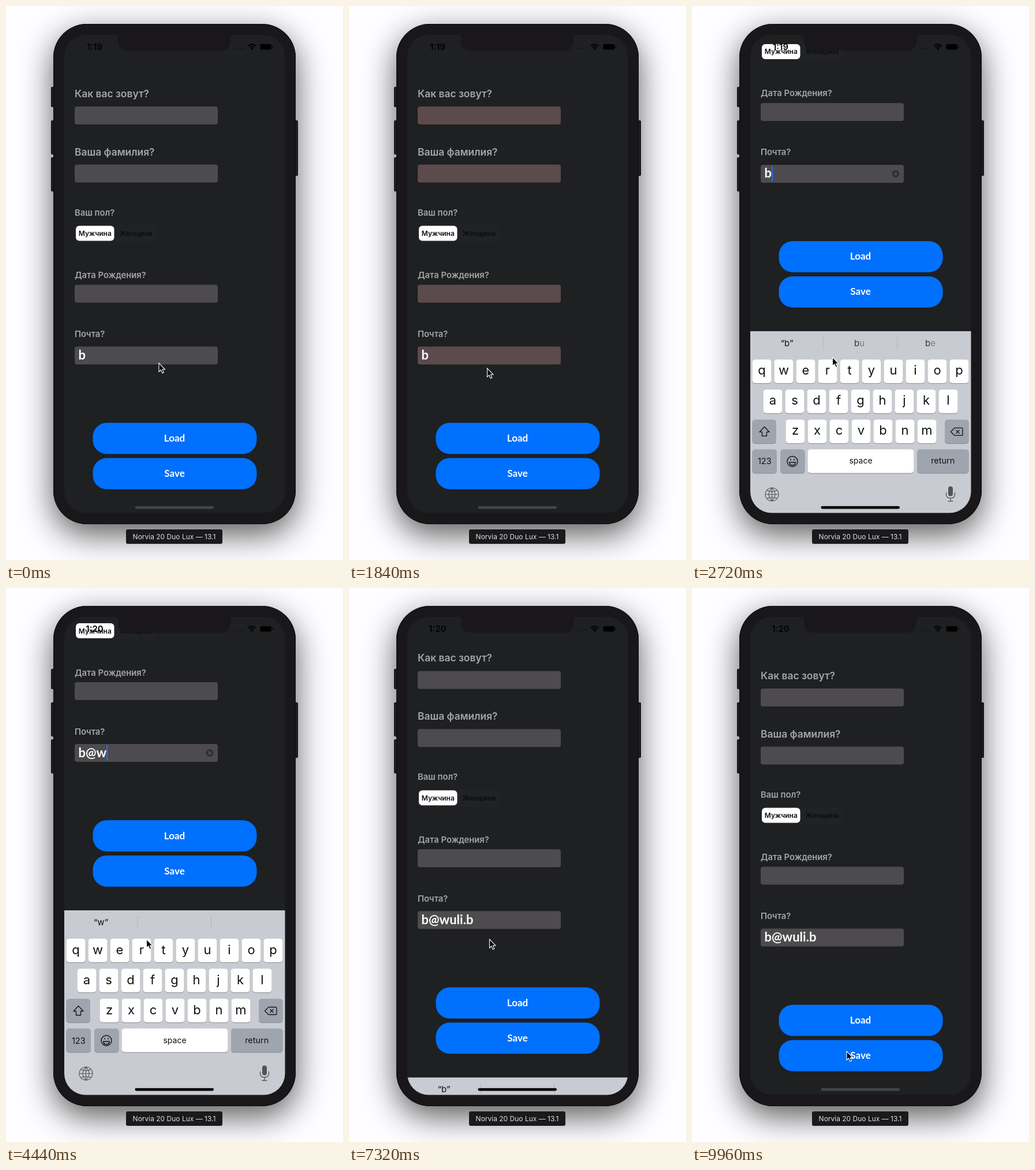
These frames come from a looping animation (584x959 px, 10000 ms). An HTML page with a canvas:

```html
<!DOCTYPE html>
<html lang="ru">
<head>
<meta charset="utf-8">
<title>Form</title>
<style>
html, body { margin: 0; width: 100%; height: 100%; overflow: hidden; background: #fefdff; }
canvas { display: block; }
</style>
</head>
<body>
<canvas id="stage" width="584" height="959"></canvas>
<script>
const c = document.getElementById('stage').getContext('2d');
const LOOP = 10000, KEYBOARD_HEIGHT = 319.5, SHOW = 2385, HIDE = 7104;
const UI = 'Inter, sans-serif', FORM = 'Lato, sans-serif';
const SCREEN = '#1e2022', BODY = '#19171a', FIELD = [77, 75, 77], ERROR = [115, 73, 75];

const MAIL = 'b@wuli.b';
const TYPED_AT = [0, 3700, 4250, 4550, 4800, 5050, 5600, 6100];
// time, x, y of the pointer tip
const POINTER = [[0, 265, 618], [850, 268, 802], [1150, 268, 802], [1750, 239.5, 627],
  [2050, 239.5, 627], [2300, 243.5, 608], [7600, 243.5, 608], [8300, 268, 802], [LOOP, 268, 802]];

const clamp = v => Math.max(0, Math.min(1, v));
const mix = (a, b, k) => a + (b - a) * k;
const smooth = k => k * k * (3 - 2 * k);
const spring = ms => ms < 0 ? 0 : 1 - Math.exp(-ms * .01826) * (1 + ms * .01826);

function box(x, y, w, h, r, fill) {
  c.fillStyle = fill;
  c.beginPath();
  c.roundRect(x, y, w, h, r);
  c.fill();
}

function text(str, x, y, font, fill, align = 'left') {
  c.font = font;
  c.fillStyle = fill;
  c.textAlign = align;
  c.fillText(str, x, y);
}

function line(path, color, width = 1.3) {
  c.strokeStyle = color;
  c.lineWidth = width;
  c.stroke(new Path2D(path));
}

function drawPhone() {
  c.fillStyle = '#fefdff';
  c.fillRect(0, 0, 584, 959);
  c.save();
  c.shadowColor = 'rgba(0,0,0,.65)';
  c.shadowBlur = 56;
  c.shadowOffsetY = 18;
  box(82, 31, 420, 866, 58, BODY);
  c.restore();
  for (const [x, y, h] of [[78, 140, 35], [78, 198, 59], [78, 262, 59], [499, 198, 96]]) {
    box(x, y, 7, h, 2, '#0a090b');
    box(x + 1, y + 1, 5, h - 2, 1, '#201e21');
  }
  box(82, 31, 420, 866, 58, '#0d0c0e');
  box(83, 32, 418, 864, 57, BODY);
  box(208, 906, 167, 25, 3, '#1a191b');
  text('Norvia 20 Duo Lux — 13.1', 291.5, 923, '12px ' + UI, '#e0dfe1', 'center');
}

function drawForm(t, editing) {
  const red = t < 1600 ? clamp((t - 1300) / 300) : clamp((2000 - t) / 400);
  const fill = `rgb(${FIELD.map((v, i) => Math.round(mix(v, ERROR[i], red)))})`;
  const label = (str, y, size) => text(str, 119, y, `600 ${size}px ${UI}`, '#a5a5a7');

  label('Как вас зовут?', 157.5, 17.4);
  label('Ваша фамилия?', 258.5, 17.4);
  label('Ваш пол?', 362.5, 14.8);
  label('Дата Рождения?', 471, 14.8);
  label('Почта?', 573, 14.8);
  for (const y of [174, 274.5, 482.5, 589.5]) box(119, y, 248, 31, 4, fill);

  box(119, 379, 142, 30, 7, '#212226');
  box(121, 380.5, 66.5, 26, 6, '#fff');
  text('Мужчина', 154.3, 398, '600 12px ' + UI, '#111', 'center');
  text('Женщина', 225.5, 398, '500 12px ' + UI, '#090a0b', 'center');

  const count = TYPED_AT.filter(at => t >= at).length;
  const typed = MAIL.slice(0, count);
  text(typed, 125.5, 612, 'bold 22px ' + FORM, '#fff');
  if (editing) {
    const caretX = 125.5 + c.measureText(typed).width;
    const idle = t - Math.max(SHOW, TYPED_AT[count - 1]);
    if (idle % 1000 < 600) box(caretX, 591.5, 2, 27, 1, '#2f6ee0');
    box(346.5, 598.5, 13, 13, 6.5, '#303032');
    line('M350.7 602.7l4.6 4.6m0-4.6l-4.6 4.6', '#59575a');
  }

  [['Load', 721.5], ['Save', 782.5]].forEach(([name, y]) => {
    box(150.5, y, 284, 54, 24, '#0070ff');
    text(name, 292, y + 32.5, 'bold 17px ' + FORM, '#fff', 'center');
  });
  return typed;
}

function drawSuggestions(t, typed) {
  const font = '15px ' + UI;
  const token = typed.split(/[@.]/).pop();
  if (token) text(`“${token}”`, 164.5, 26, font, '#111', 'center');
  if (typed !== 'b') return;
  [['but', 281], ['best', 404]].forEach(([word, x]) => {
    [...word].forEach((letter, i) => {
      c.globalAlpha = clamp((t - 2620) / 100 - i * .5);
      text(letter, x, 26, font, '#333', 'left');
      x += c.measureText(letter).width;
    });
    c.globalAlpha = 1;
  });
}

function key(x, y, w, fill, name, size, baseline) {
  box(x, y + 1, w, 41, 5, '#898c92');
  box(x, y, w, 41, 5, fill);
  if (name) text(name, x + w / 2, y + baseline, `${size}px ${UI}`, '#111', 'center');
}

function drawKeyboard(t, top, typed) {
  const gray = '#9fa5af';
  c.save();
  c.translate(0, top);
  c.fillStyle = '#c8cbd1';
  c.fillRect(100, 0, 384, 330);
  line('M228 10v22M355.5 10v22', '#b3b6bc', 1);
  drawSuggestions(t, typed);

  [['qwertyuiop', 104.5, 49], ['asdfghjkl', 123.5, 101], ['zxcvbnm', 162.5, 153]]
    .forEach(([row, x, y]) => [...row].forEach((ch, i) => key(x + 38 * i, y, 33, '#fff', ch, 22, 26.5)));
  key(104.5, 153, 41.5, gray);
  key(438, 153, 41.5, gray);
  key(104.5, 204.5, 42.5, gray, '123', 14.5, 26);
  key(153, 204.5, 42.5, gray);
  key(200.5, 204.5, 184, '#fff', 'space', 14, 25);
  key(390, 204.5, 89.5, gray, 'return', 14.5, 25);

  c.lineJoin = 'round';
  line('M125.5 165.5l8.5 9h-4.5v7h-8v-7h-4.5z', '#111');
  line('M455 167.5h12q2 0 2 2v9q0 2-2 2h-12l-6.5-6.5zM457.5 171l6 6m0-6l-6 6', '#111');
  line('M183 225.5a9 9 0 1 1-18 0a9 9 0 1 1 18 0M168.5 227h11q-1 5-5.5 5t-5.5-5zM171 221v2.5M177 221v2.5', '#111', 1.4);
  line('M150 282.5a11.5 11.5 0 1 1-23 0a11.5 11.5 0 1 1 23 0M127 282.5h23M138.5 271v23' +
    'M138.5 271q-11 11.5 0 23q11-11.5 0-23M130 275.5q8.5 4 17 0M130 289.5q8.5-4 17 0', '#50545b', 1.1);
  box(444, 268.5, 8, 17, 4, '#50545b');
  line('M440.5 279v3q0 7 7.5 7t7.5-7v-3M448 289v5.5M443.5 294.5h9', '#50545b');
  c.restore();
}

function drawStatus(t) {
  c.fillStyle = BODY;
  c.fill(new Path2D('M187 49q7 0 7 7v3q0 18.5 18 18.5h159q18 0 18-18.5v-3q0-7 7-7z'));
  text(t < 3000 ? '1:19' : '1:20', 153.5, 76, '600 15px ' + UI, '#000', 'center');
  for (let i = 0; i < 4; i++) box(396 + i * 4.7, 72, 3, 3, 1.5, '#15171a');
  line('M419 69q7-5.5 14 0M421.6 71.8q4.4-3.4 8.8 0', '#000', 2);
  c.fillStyle = '#000';
  c.fill(new Path2D('M423.5 73.6q2.5-1.8 5 0l-2.5 2.6z'));
  box(440.5, 66, 19.5, 9.5, 2.5, '#000');
  box(461, 69, 1.5, 3.5, 1, '#000');
}

function drawPointer(t) {
  const i = POINTER.findIndex(p => p[0] > t);
  const [t0, x0, y0] = POINTER[i - 1], [t1, x1, y1] = POINTER[i];
  const k = smooth((t - t0) / (t1 - t0));
  const arrow = new Path2D('M0 0v15l3.4-3l2.4 5.5l2.5-1l-2.3-5.5h4.5z');
  c.save();
  c.translate(mix(x0, x1, k), mix(y0, y1, k));
  c.fillStyle = '#000';
  c.fill(arrow);
  c.strokeStyle = '#fff';
  c.lineWidth = 1.1;
  c.stroke(arrow);
  c.restore();
}

function draw(now) {
  const t = now % LOOP;
  const lift = KEYBOARD_HEIGHT * (spring(t - SHOW) - spring(t - HIDE));
  drawPhone();

  c.save();
  c.beginPath();
  c.roundRect(101, 50, 382.5, 827.5, 37);
  c.clip();
  c.fillStyle = SCREEN;
  c.fillRect(100, 49, 385, 830);
  c.save();
  c.translate(0, -lift);
  const typed = drawForm(t, t >= SHOW && t < HIDE);
  c.restore();
  if (lift > .3) drawKeyboard(t, 877.5 - lift, typed);
  box(223.5, 865.8, 136.5, 4.6, 2.3, lift > 5 ? '#000' : '#434446');
  drawStatus(t);
  c.restore();

  drawPointer(t);
  requestAnimationFrame(draw);
}
requestAnimationFrame(draw);
</script>
</body>
</html>
```
